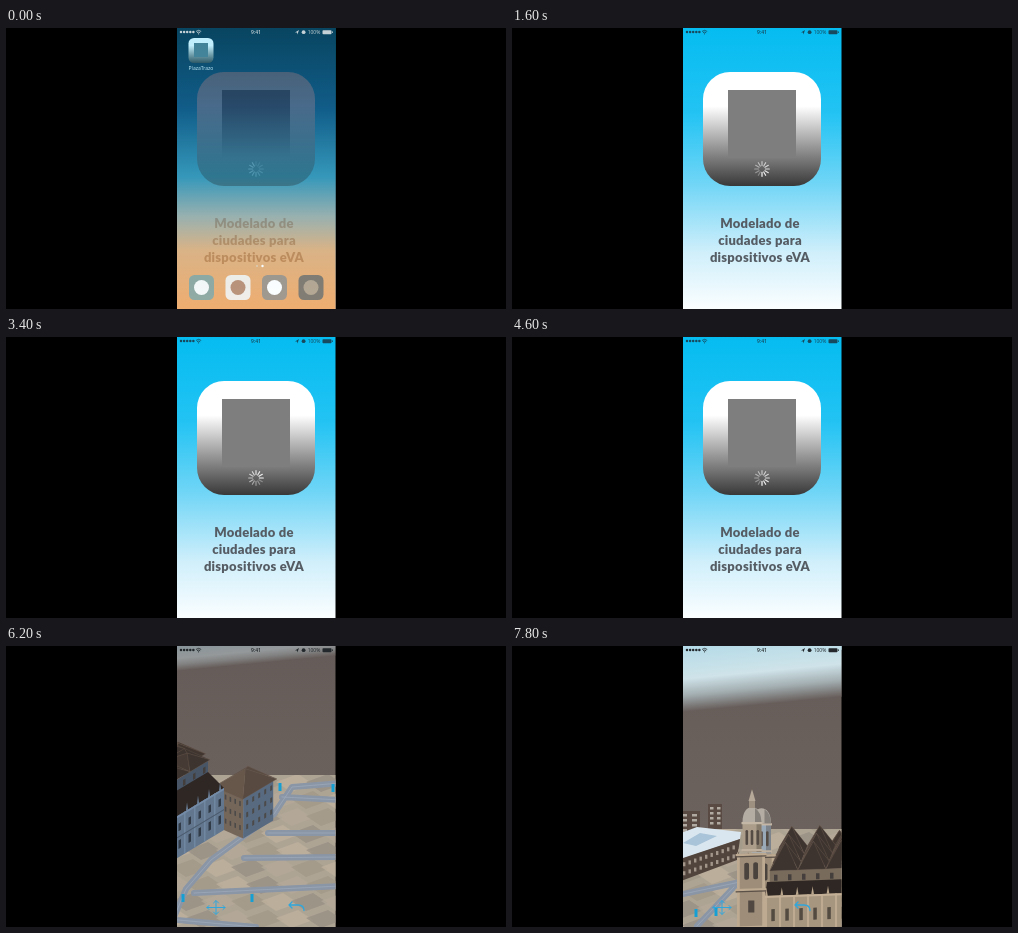
An HTML page for the animation above (8 s loop, 500x281 px).

```html
<!DOCTYPE html>
<html lang="es">
<head>
<meta charset="utf-8">
<title>Modelado de ciudades</title>
<style>
html, body { margin: 0; width: 100%; height: 100%; overflow: hidden; background: #000; }
svg { display: block; width: 100vw; height: 100vh; }
svg svg { width: auto; height: auto; }
.ui { font-family: "Open Sans", Inter, sans-serif; font-size: 5px; text-anchor: middle; }
.title { font: 900 13px Lato, "Open Sans", sans-serif; letter-spacing: .25px; text-anchor: middle; fill: #555c63; }
</style>
</head>
<body>
<svg viewBox="0 0 500 281">
  <defs>
    <clipPath id="screen"><rect x="171" width="158.5" height="281"/></clipPath>
    <linearGradient id="splashBg" x2="0" y2="1">
      <stop offset="0" stop-color="#05bcf1"/><stop offset=".3" stop-color="#22c3f3"/>
      <stop offset=".55" stop-color="#6fd5f6"/><stop offset=".8" stop-color="#d0effb"/>
      <stop offset="1" stop-color="#fbfeff"/>
    </linearGradient>
    <linearGradient id="homeBg" x2="0" y2="1">
      <stop offset="0" stop-color="#0a1e30"/><stop offset=".28" stop-color="#0c3964"/>
      <stop offset=".53" stop-color="#2584a6"/><stop offset=".67" stop-color="#96a097"/>
      <stop offset=".79" stop-color="#dd9f60"/><stop offset="1" stop-color="#eb9240"/>
    </linearGradient>
    <linearGradient id="tile" x2="0" y2="1">
      <stop offset=".3" stop-color="#fff"/><stop offset=".65" stop-color="#999"/>
      <stop offset="1" stop-color="#383838"/>
    </linearGradient>
    <linearGradient id="sky" x2="0" y2="1">
      <stop offset="0" stop-color="#b4dbe8"/><stop offset=".5" stop-color="#cfe3e9"/>
      <stop offset=".75" stop-color="#a3aeb1"/><stop offset="1" stop-color="#675e5b"/>
    </linearGradient>
    <linearGradient id="haze" x2="0" y2="1">
      <stop offset="0" stop-color="#655c59"/><stop offset="1" stop-color="#70655f"/>
    </linearGradient>
  </defs>
  <g id="stage" clip-path="url(#screen)"></g>
</svg>
<script>
const LOOP = 8000, STEP = 200, CUT = 6200, LEG = 800;
const stage = document.getElementById('stage');

// Camera poses at CUT, CUT + LEG and CUT + 2 * LEG.
const poses = {
  origin: [[138, 232], [243, 278], [225, 318]],
  depth: [[1, -.6], [.63, -.67], [1.4, -.05]],
  front: [[-.8, -.35], [-1, -.08], [.1, -.25]],
  size: [[42, 27], [56, 33], [67, 44]],
  sky: [[22, .45], [41, .9], [63, 1]],
  horizon: [[129], [153], [183]],
  drift: [[0, 0], [81, 45], [110, 75]],
  town: [[-100, -50], [-21, -19], [0, 0]],
  tint: [[98, 118, 142], [142, 146, 156], [166, 149, 127]]
};

const range = (n, fn) => Array.from({ length: n }, (_, i) => fn(i)).join('');
const rect = (x, y, w, h, fill, more = '') =>
  `<rect x="${x}" y="${y}" width="${w}" height="${h}" fill="${fill}" ${more}/>`;
const circle = (x, y, r, fill) => `<circle cx="${x}" cy="${y}" r="${r}" fill="${fill}"/>`;
const path = (d, fill, more = '') => `<path d="${d}" fill="${fill}" ${more}/>`;
const poly = (pts, fill, more) => path('M' + pts.join('L') + 'Z', fill, more);
const line = (d, color, width) =>
  path(d, 'none', `stroke="${color}" stroke-width="${width}" stroke-linejoin="round" stroke-linecap="round"`);
const text = (x, y, str, cls, more = '') => `<text x="${x}" y="${y}" class="${cls}" ${more}>${str}</text>`;
const move = (x, y, body) => `<g transform="translate(${x} ${y})">${body}</g>`;

function statusBar(color) {
  return range(5, i => circle(175 + i * 3.1, 4, 1.25, color)) +
    line('M190.3 3.2q2.3-2 4.6 0M191.3 4.5q1.3-1.1 2.6 0', color, .8) + circle(192.6, 5.8, .6, color) +
    text(250, 6, '9:41', 'ui', `fill="${color}" font-weight="600"`) +
    poly([[289, 4.4], [293, 2], [291.4, 6.4], [291, 4.6]], color) +
    circle(297.6, 4.2, 1.9, color) +
    text(308, 6, '100%', 'ui', `fill="${color}"`) +
    rect(316.5, 2.2, 9, 4, color, 'rx=".8"') + rect(326, 3.4, .8, 1.6, color);
}

function spinner(t) {
  const turn = Math.floor(t * 12 / 1000) * 30;
  return move(250, 141, range(12, i =>
    `<line y1="-3.4" y2="-7.3" stroke="#fff" stroke-width="1.2" stroke-linecap="round"
      opacity="${.3 + .06 * i}" transform="rotate(${turn + i * 30})"/>`));
}

function splash(t) {
  return rect(171, 0, 159, 281, 'url(#splashBg)') +
    rect(191, 44, 118, 114, 'url(#tile)', 'rx="27"') +
    rect(216, 62, 68, 68, '#7e7e7e') + spinner(t) +
    text(248, 200, 'Modelado de', 'title') +
    text(248, 217, 'ciudades para', 'title') +
    text(248, 234, 'dispositivos eVA', 'title');
}

function home() {
  const icons = [['#6f8f86', '#f4f6f4'], ['#efe9e2', '#a8704f'], ['#85796b', '#fff'], ['#5d5346', '#a08d70']];
  return rect(171, 0, 159, 281, 'url(#homeBg)') +
    rect(182.5, 10, 25, 25, 'url(#tile)', 'rx="5.5"') + rect(188, 15, 14, 14, '#56707c') +
    text(195, 42, 'PlazaTrazo', 'ui', 'fill="#fff"') +
    circle(251, 238, 1, '#d9c0a0') + circle(256.5, 238, 1.2, '#fff') +
    icons.map(([bg, dot], i) => rect(183 + i * 36.5, 247, 25, 25, bg, 'rx="5.5"') +
      circle(195.5 + i * 36.5, 259.5, 7.5, dot)).join('');
}

function controls() {
  return line('M210 255v13M201 261.500h18M207.500 257l2.500-2.500 2.500 2.500M207.500 266l2.500 2.500 2.500-2.500M203 259.500l-2 2 2 2M217 259.500l2 2-2 2', '#2fa6dc', 1) +
    line('M283 259h9q6 0 6 5.500M286 256l-3 3 3 3', '#2fa6dc', 1.3);
}

function city(t) {
  const k = (t - CUT) / LEG, leg = Math.min(1, Math.floor(k)), p = k - leg;
  const pose = {};
  for (const name in poses) {
    const [a, b] = poses[name].slice(leg, leg + 2);
    pose[name] = a.map((v, i) => +(v + (b[i] - v) * p).toFixed(3));
  }
  const { origin, depth, front, size, sky, horizon, drift, town, tint } = pose;
  const [wall, rise] = size;
  const shade = m => `rgb(${tint.map(v => Math.round(v * m))})`;
  // f runs along the facade, s along the side wall, h upwards.
  const at = (f, s, h = 0) => [0, 1].map(i =>
    +(origin[i] + f * front[i] + s * depth[i] - (i ? h : 0)).toFixed(2));
  const plane = (dir, f, s, body) => {
    const [x, y] = at(f, s);
    return `<g transform="matrix(${dir[0]} ${dir[1]} 0 1 ${x} ${y})">${body}</g>`;
  };

  function backdrop() {
    const [edge, glow] = sky, [ground] = horizon;
    return rect(171, 0, 159, 281, 'url(#haze)') +
      `<g transform="translate(171 ${edge}) skewY(-5.5)" opacity="${glow}">` +
      rect(0, -edge - 1, 159, 20, '#b4dbe8') + rect(0, -edge, 159, edge + 3, 'url(#sky)') + '</g>' +
      `<svg x="171" y="${ground}" width="159" height="${281 - ground}" overflow="hidden">` +
      rect(0, 0, 159, 281, '#aea494') + move(drift[0] - 171, drift[1] - ground, paving()) + '</svg>';
  }

  function paving() {
    const tones = ['#978f85', '#bfb29e', '#a29889', '#b5aa9a'];
    const tiles = range(18 * 13, n => {
      const row = Math.floor(n / 18), x = -60 + (n % 18) * 30 + row % 2 * 15, y = 68 + row * 17;
      return poly([[x, y], [x + 22, y - 8], [x + 37, y + 2], [x + 15, y + 10]], tones[(n * 7 + row * 3) % 4], 'opacity=".75"');
    });
    const roads = 'M160 290L180 243L205 214L268 168L286 141L335 137M188 247L335 240M238 212L335 211' +
      'M262 187L335 187M276 151L335 154M150 272L250 281M61 173L118 161M75 205L112 166';
    const posts = [[274, 141], [327, 142], [246, 252], [177, 252], [74, 192], [94, 191], [164, 125]];
    return tiles + line(roads, '#8a95a6', 6) + line(roads, '#9fabbb', .7) +
      posts.map(([x, y]) => rect(x - 1.5, y - 4, 3, 8, '#159fd3')).join('');
  }

  function oldTown() {
    const block = (x, y, w, h) => rect(x, y, w, h, '#594b43') +
      range(8, i => rect(x + 2 + i % 2 * w / 2, y + 3 + (i >> 1) * 5, w / 4, 2.5, '#b1aaa2'));
    return move(town[0], town[1],
      block(196, 158, 14, 25) + block(168, 165, 20, 20) +
      poly([[120, 205], [185, 181], [229, 186], [228, 193], [150, 220]], '#d9e6ef') +
      poly([[171, 197], [188, 187], [205, 190], [184, 200]], '#a9c3d8') +
      poly([[150, 219], [228, 193], [225, 214], [150, 242]], '#51443d') +
      range(24, i => {
        const x = 160 + i % 12 * 5.5;
        return rect(x, 220 - (x - 160) * .34 + (i > 11 ? 9 : 0), 2.4, 4, '#a2968a');
      }));
  }

  function pyramid(f0, f1, s0, s1, base, top, dark, light) {
    const a = at(f0, s0, base), b = at(f1, s0, base), c = at(f0, s1, base), d = at(f1, s1, base);
    const tip = at((f0 + f1) / 2, (s0 + s1) / 2, top);
    const edge = 'stroke="#6d5e52" stroke-width=".3"';
    return poly([b, d, tip], dark, edge) + poly([d, c, tip], dark, edge) +
      poly([a, b, tip], light, edge) + poly([a, c, tip], dark, edge);
  }

  function annex() {
    const panes = n => range(n * 3, i => rect(3 + i % n * 6, -36 + Math.floor(i / n) * 12, 2, 5, '#4c4a49'));
    return plane(front, -24, 80, rect(0, -42, 32, 42, '#75665a') + panes(5)) +
      plane(depth, -24, 80, rect(0, -42, 30, 42, shade(.9)) + panes(5)) +
      pyramid(-26, 10, 78, 112, 41, 55, '#584a40', '#67574a');
  }

  // Low hip roofs over the nave, a raised crossing, then the lean-to aisle.
  function roofs() {
    const eave = wall + 20;
    const hips = range(9, i => {
      const f = 84 - Math.floor(i / 3) * 32, s = 62 - i % 3 * 20;
      return pyramid(f, f + 32, s, s + 20, eave, wall + rise, '#3d342f', i % 2 ? '#5b4d42' : '#463b34');
    });
    const crossing = pyramid(28, 62, 56, 84, eave + 2, wall + rise + 8, '#40362f', '#584a3f');
    return crossing + plane(depth, 20, 22, rect(0, -eave, 58, eave, shade(.72)) +
      range(6, i => rect(i * 10 + 3, -eave + 4, 2.5, 6, '#443f3d'))) + hips +
      poly([at(0, 20, wall), at(0, 80, wall), at(20, 80, wall + 9), at(20, 20, wall + 9)], '#2f2723');
  }

  const pinnacles = (n, gap, top, color) =>
    range(n, i => poly([[i * gap, -top], [i * gap + 1, -top - 8], [i * gap + 2, -top]], color));

  function sideWall() {
    return plane(depth, 0, 20, rect(0, -wall, 60, wall, shade(1)) +
      range(6, i => rect(i * 10, -wall, 1.5, wall, shade(1.14)) +
        rect(i * 10 + 4.5, -wall * .8, 2.5, wall * .18, shade(.5)) +
        rect(i * 10 + 4.5, -wall * .4, 2.5, wall * .2, shade(.5))) +
      rect(0, -wall, 60, 2, shade(1.18)) + rect(0, -wall * .5, 60, 1.3, shade(.78)) +
      pinnacles(6, 11, wall, shade(1.12)));
  }

  function facade() {
    const bays = range(8, i => {
      const u = i * 11;
      return rect(u, -84, 2, 84, '#ab9b86') + rect(u + 2, -84, 1, 84, '#64574b') +
        rect(u + 5, -74, 4, 11, '#453d38', 'rx="2"') + rect(u + 5, -47, 4, 13, '#4b413a') +
        (i % 3 ? rect(u + 5, -20, 4, 10, '#4f453d') : rect(u + 3.5, -20, 7, 20, '#1f4960', 'rx="3.5"'));
    });
    return plane(front, 20, 0, rect(0, -84, 88, 84, '#8a7a68') + bays +
      [84, 56, 28].map(h => rect(0, -h, 88, 2.2, '#baab96') + rect(0, -h + 2.2, 88, 1.3, '#5a4f46')).join('') +
      pinnacles(8, 11, 84, '#b8aa98'));
  }

  function tower(f, drop, stone, spire) {
    const top = 110 - drop, mid = 75 - drop;
    const face = (w, fill, trim) => rect(0, -top, w, top, fill) +
      rect(0, -top, 2, top, trim) + rect(w - 2, -top, 2, top, trim) +
      [top, mid, mid / 2].map(h => rect(-1, -h, w + 2, 2.2, trim) + rect(-1, 2.2 - h, w + 2, 1.3, '#5c5148')).join('') +
      [.26, .58].map(u => rect(w * u, -top + 9, w * .17, 17, '#4a423d', `rx="${w * .08}"`)).join('') +
      rect(w * .4, -mid + 12, w * .22, 12, '#514842') + rect(w * .4, -mid / 2 + 10, w * .22, 13, '#2f4f61');
    const [x, y] = at(f + 10, 10);
    const crown = rect(-9.5, -138, 19, 29, stone) + rect(4.5, -138, 5, 29, '#40363055') +
      [-6.5, -1.3, 4.5].map(u => rect(u, -131, 2.6, 15, '#554b45', 'rx="1.3"')).join('') +
      rect(-10.5, -139, 21, 2.2, '#c4b7a6') + rect(-10.5, -112, 21, 2.2, '#bfb19e') +
      path('M-9.500-139C-9.500-149-5-154 0-154S9.500-149 9.500-139Z', '#b3ada4') +
      path('M3-139V-153Q9-149 9.500-139Z', '#86807b');
    const tip = rect(-3, -160, 6, 7, '#9d9080') + poly([[-3.5, -160], [0, -172], [3.5, -160]], '#b5a898') +
      line('M0-171V-178', '#6d635b', .7);
    return plane(front, f, 0, face(20, '#988977', '#b8a996')) +
      plane(depth, f, 0, face(20, shade(.95), shade(1.14))) +
      move(x, y + drop, crown + (spire ? tip : ''));
  }

  return backdrop() + oldTown() + annex() + tower(95, 25, '#9aa9b8', false) +
    roofs() + sideWall() + facade() + tower(0, 0, '#ab9d8a', true) + controls();
}

function draw(t) {
  if (t >= CUT) return city(t) + statusBar('#22282b');
  const veil = [.75, .28][t / STEP] || 0;
  return splash(t) + statusBar('#174a5e') +
    (veil ? `<g opacity="${veil}">${home()}${statusBar('#fff')}</g>` : '');
}

const start = performance.now();
let shown = -1;
function tick() {
  const t = Math.floor((performance.now() - start) % LOOP / STEP) * STEP;
  if (t !== shown) stage.innerHTML = draw(shown = t);
  requestAnimationFrame(tick);
}
tick();
</script>
</body>
</html>
```
